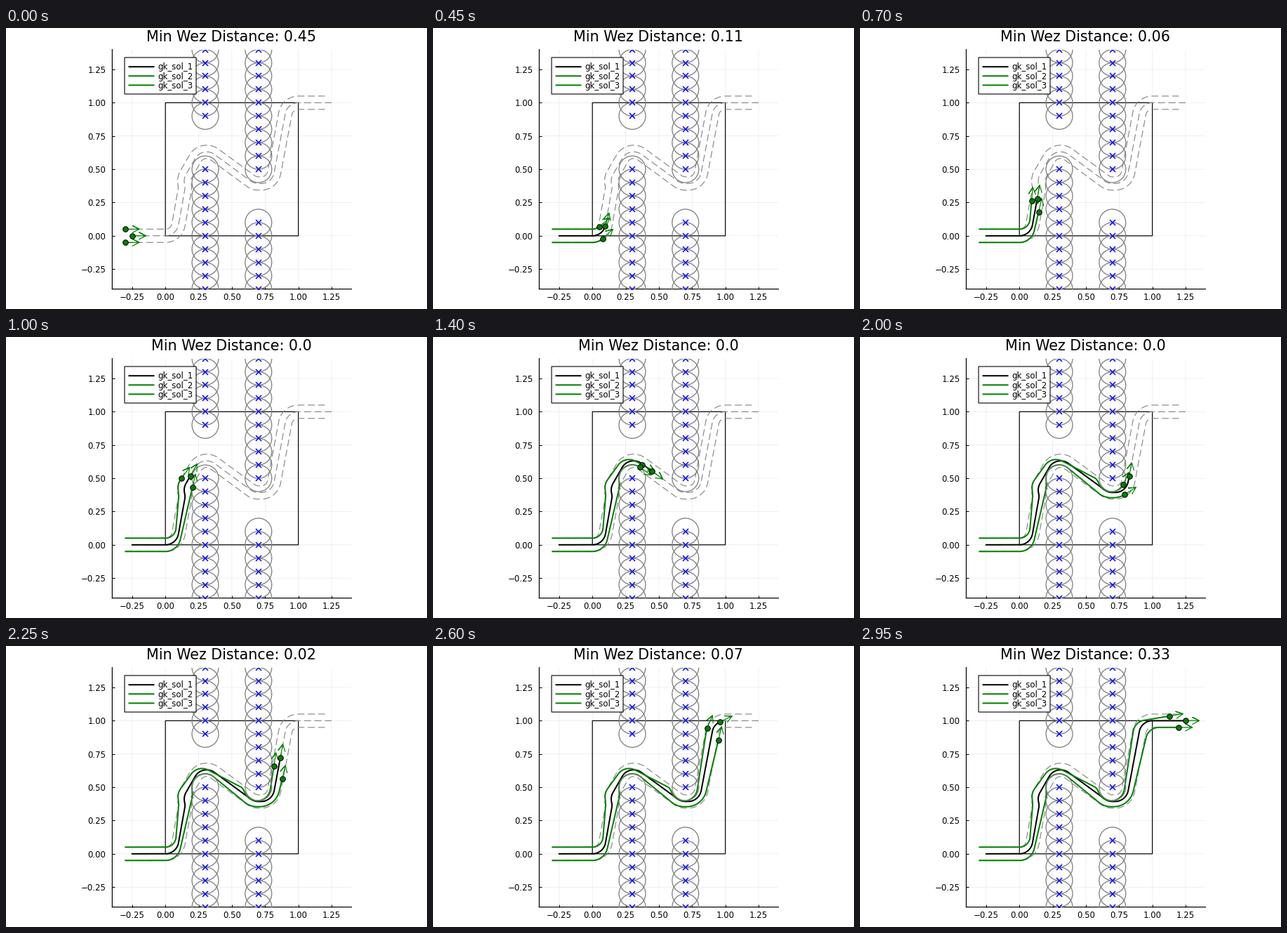
A matplotlib script that plays this animation: 600x400 px, repeating every 3 s.

```python
import numpy as np
import matplotlib.pyplot as plt
from matplotlib.animation import FuncAnimation
from matplotlib.patches import Circle, Rectangle

FRAMES, INTERVAL = 60, 50
PX = 0.72   # points per pixel at 100 dpi
R = 0.1     # obstacle radius, also the leader's turn radius
GAP = 0.05  # formation spacing
GREEN, GRAY = "#008000", "#808080"

plt.rcParams["font.family"] = "DejaVu Sans"
plt.rcParams["path.snap"] = False


# --- paths -----------------------------------------------------------------
def turn_path(turns):
    """Join turns (x, y, radius; left > 0 > right) by their common tangents.

    A radius of 0 makes a plain end point.
    """
    headings = []
    for (x0, y0, r0), (x1, y1, r1) in zip(turns, turns[1:]):
        dx, dy = x1 - x0, y1 - y0
        bend = np.clip((r1 - r0) / np.hypot(dx, dy), -1, 1)
        headings.append(np.arctan2(dy, dx) - np.arcsin(bend))
    headings = [headings[0], *headings, headings[-1]]
    pts = []
    for (x, y, r), a, b in zip(turns, headings, headings[1:]):
        th = np.linspace(a, b, 40 if r else 1)
        pts.append(np.c_[x + r * np.sin(th), y - r * np.cos(th)])
    return np.vstack(pts)


def lane(side):
    """Planned path of one formation slot, beside the leader's turns."""
    off = GAP * side
    back = GAP * abs(side)
    return turn_path([(-0.25 - back, off, 0)]
                     + [(x, y, r - off) for x, y, r in turns]
                     + [(1.25 - back, 1 + off, 0)])


turns = [(0, 0.1, R), (0.0475, 0.3626, R), (0.2415, 0.411, -R), (0.31, 0.531, -R),
         (0.7, 0.493, R), (0.72, 0.493, R), (1, 0.9, -R)]
upper = turn_path([
    (-0.3, 0.05, 0), (0, 0.13, 0.08), (0, 0.365, R), (0.195, 0.43, -R),
    (0.275, 0.541, -R), (0.535, 0.452, -0.06), (0.69, 0.498, R),
    (0.955, 0.905, -R), (1.128, 1.035, 0)])
lower = turn_path([
    (-0.3, -0.05, 0), (0, 0.065, 0.115), (0.303, 0.42, -R), (0.3, 0.501, -R),
    (0.69, 0.504, 0.15), (0.71, 0.504, 0.15), (1.05, 0.85, -R), (1.197, 0.95, 0)])


class Agent:
    def __init__(self, path, pace=1):
        self.path, self.pace = path, pace
        self.s = np.r_[0, np.cumsum(np.hypot(*np.diff(path, axis=0).T))]

    def at(self, s):
        return np.array([np.interp(s, self.s, self.path[:, k]) for k in (0, 1)])

    def state(self, i):
        end = self.s[-1]
        s = end * (i / (FRAMES - 1)) ** self.pace
        pos = self.at(s)
        d = self.at(min(s + 0.006, end)) - self.at(max(s - 0.006, 0))
        return pos, d / np.hypot(*d), np.vstack([self.path[self.s < s], pos])


agents = [Agent(lane(0)), Agent(upper, pace=1.02), Agent(lower)]
colors = ["black", GREEN, GREEN]

# two walls of obstacles, each with a doorway
obstacles = np.array([(x, k / 10) for x, lo, hi in [(0.3, 5, 9), (0.7, 1, 5)]
                      for k in range(-4, 15) if k <= lo or k >= hi])

# --- static scene ----------------------------------------------------------
fig = plt.figure(figsize=(6, 4), dpi=100, facecolor="white")
ax = fig.add_axes([151.4 / 600, 28.4 / 400, 341 / 600, 341 / 400])
ax.set(xlim=(-0.4, 1.4), ylim=(-0.4, 1.4))
ticks = np.arange(-0.25, 1.3, 0.25)
names = [f"{t:.2f}".replace("-", "\u2212") for t in ticks]
ax.set_xticks(ticks, names)
ax.set_yticks(ticks, names)
ax.tick_params(direction="in", length=4 * PX, width=PX, labelsize=11.8 * PX)
ax.tick_params(axis="x", pad=5.5 * PX)
ax.tick_params(axis="y", pad=9 * PX)
ax.spines[["top", "right"]].set_visible(False)
ax.spines[["left", "bottom"]].set_linewidth(1.2 * PX)
ax.set_axisbelow(True)
ax.grid(color="black", alpha=0.1, lw=0.6 * PX)

ax.add_patch(Rectangle((0, 0), 1, 1, fill=False, lw=1.2 * PX, zorder=2))
for side in (-1, 0, 1):
    ax.plot(*lane(side).T, color=GRAY, lw=1.1 * PX, dashes=(9, 4.5), zorder=2.2,
            dash_capstyle="butt")
for c in obstacles:
    ax.add_patch(Circle(c, R, fill=False, ec=GRAY, lw=1.3 * PX, zorder=4))
ax.plot(*obstacles.T, "x", color="blue", ms=7.5 * PX, mew=1.5 * PX, zorder=4.1)

# legend and title, in pixels from the top left corner
over = fig.add_axes([0, 0, 1, 1], zorder=5)
over.set(xlim=(0, 600), ylim=(400, 0))
over.axis("off")
over.add_patch(Rectangle((169, 42), 102, 52, fc="white", ec="black", lw=1.1 * PX))
for k, color in enumerate(colors):
    y = 55.2 + 13.1 * k
    over.plot([174.5, 211.5], [y, y], color=color, lw=2 * PX, solid_capstyle="butt")
    over.text(216, y + 4.3, f"gk_sol_{k + 1}", size=11.8 * PX, va="baseline")
title = over.text(321.3, 18.8, "", size=20.7 * PX, ha="center", va="baseline")

# --- moving parts ----------------------------------------------------------
trails, arrows, dots = [], [], []
for color in colors:
    trails += ax.plot([], [], color=color, lw=2 * PX, zorder=3)
    arrows += ax.plot([], [], color=GREEN, lw=1.2 * PX, zorder=5)
    dots += ax.plot([], [], "o", mfc=GREEN, mec="black", ms=7.6 * PX, mew=PX, zorder=6)


def arrow_shape(pos, d):
    side = 0.026 * np.array([-d[1], d[0]])
    tip = pos + 0.103 * d
    back = tip - 0.05 * d
    return np.array([pos, tip, back + side, tip, back - side])


def update(i):
    gap = np.inf
    for agent, trail, arrow, dot in zip(agents, trails, arrows, dots):
        pos, d, done = agent.state(i)
        trail.set_data(*done.T)
        arrow.set_data(*arrow_shape(pos, d).T)
        dot.set_data([pos[0]], [pos[1]])
        gap = min(gap, np.hypot(*(obstacles - pos).T).min() - R)
    title.set_text(f"Min Wez Distance: {round(float(max(gap, 0)), 2)}")
    return [*trails, *arrows, *dots, title]


anim = FuncAnimation(fig, update, frames=FRAMES, interval=INTERVAL,
                     repeat=True, repeat_delay=0)
plt.show()
```
